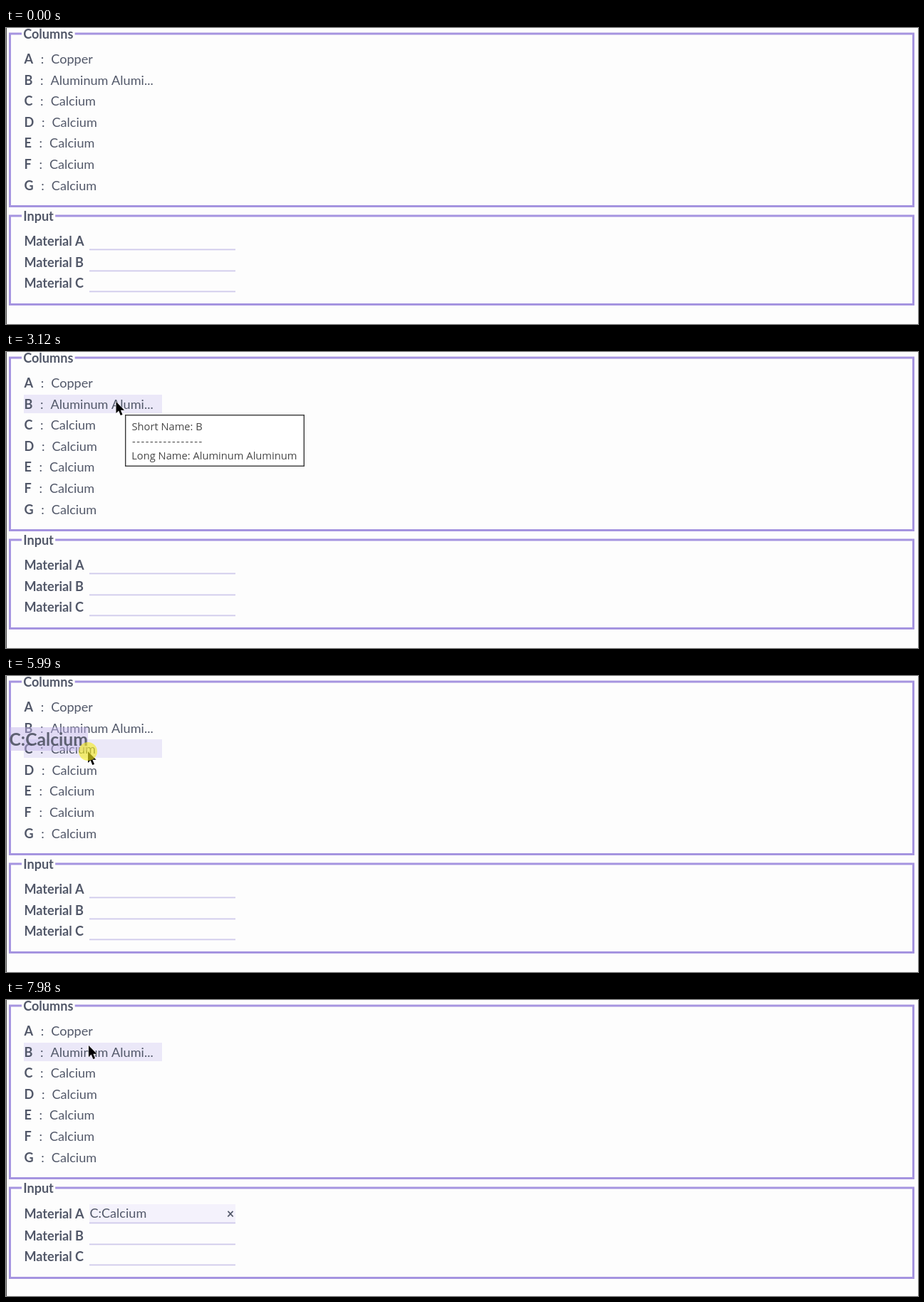
Animation of 1280 by 416 pixels, one loop 8000 ms. Source, as an HTML page with a canvas:

```html
<!DOCTYPE html>
<html lang="en">
<head>
<meta charset="utf-8">
<title>Column drag and drop</title>
<style>
  html, body { margin: 0; width: 100%; height: 100%; overflow: hidden; background: #fdfdfd; }
  canvas { display: block; }
</style>
</head>
<body>
<canvas id="stage" width="1280" height="416"></canvas>
<script>
const ctx = document.getElementById('stage').getContext('2d');
const LOOP = 8000, DRAG_START = 5990, DROP = 7350;
const STEP = 125, TIP_DELAY = 500, ROW = 29.6;
const PAPER = '#fdfdfd', PURPLE = '#a594e0', INK = '#525869', TIP_INK = '#484848';
const BODY = '18.1px Lato, sans-serif';
const BOLD = 'bold 18.1px Lato, sans-serif';
const GHOST = 'bold 24.7px Lato, sans-serif';
const TIP = '14.7px "Open Sans", sans-serif';

const columns = ['Copper', 'Aluminum Aluminum', ...Array(5).fill('Calcium')]
  .map((name, i) => ({ letter: 'ABCDEFG'[i], name }));

const easeOut = p => 1 - (1 - p) ** 2;
const smooth = p => p * p * (3 - 2 * p);

// The pointer reaches (x, y) in visible steps between two times.
const moves = [
  { start: 270, end: 270, x: 718, y: 344 },
  { start: 390, end: 760, x: 157, y: 77 },
  { start: 900, end: 1000, x: 155, y: 42.5 },
  { start: 2130, end: 2620, x: 154.5, y: 69 },
  { start: 4120, end: 4360, x: 110.5, y: 101 },
  { start: DRAG_START, end: DRAG_START, x: 115, y: 105 },
  { start: 6130, end: 6360, x: 203, y: 308, ease: smooth },
  { start: 6490, end: 6490, x: 206, y: 323 },
  { start: 6600, end: 6850, x: 194, y: 289 },
  { start: 7480, end: 7980, x: 116, y: 63, ease: smooth }
];

function pointerAt(t) {
  const i = moves.findLastIndex(move => move.start <= t);
  if (i < 0) return null;
  const { start, end, x, y, ease = easeOut } = moves[i];
  if (t >= end) return { x, y, rested: t - end };
  const from = moves[i - 1];
  const count = Math.round((end - start) / STEP) + 1;
  const p = ease((Math.floor((t - start) / STEP) + 1) / count);
  return { x: from.x + (x - from.x) * p, y: from.y + (y - from.y) * p, rested: 0 };
}

function text(str, x, y, font, color = INK, align = 'left') {
  ctx.font = font;
  ctx.fillStyle = color;
  ctx.textAlign = align;
  ctx.fillText(str, x, y);
}

function widthOf(str, font) {
  ctx.font = font;
  return ctx.measureText(str).width;
}

function box(x, y, w, h, color) {
  ctx.fillStyle = color;
  ctx.fillRect(x, y, w, h);
}

function frame(x, y, w, h, color, line) {
  ctx.strokeStyle = color;
  ctx.lineWidth = line;
  ctx.strokeRect(x + line / 2, y + line / 2, w - line, h - line);
}

function fieldset(title, top, bottom, baseline) {
  frame(4, top, 1271, bottom - top, PURPLE, 3);
  box(22, top - 1, widthOf(title, BOLD) + 4.5, 5, PAPER);
  text(title, 24.2, baseline, BOLD);
}

function drawColumns(hovered) {
  fieldset('Columns', 6.5, 252, 15);
  if (hovered >= 0) box(25, Math.round(30 + ROW * hovered), 194, 26, '#ebe8f8');
  columns.forEach(({ letter, name }, i) => {
    const y = Math.round(50 + ROW * i);
    const nameX = 50.7 + widthOf(letter, BOLD);
    text(letter, 25.6, y, BOLD);
    text(':', nameX - 12.3, y, BODY, INK, 'center');
    text(name.length > 14 ? name.slice(0, 14) + '...' : name, nameX, y, BODY);
  });
}

function drawInput(filled, target) {
  const shift = filled ? 2 : 0;
  fieldset('Input', 262.5, 390 + shift, 271);
  if (filled) {
    box(117, 287, 205, 26, '#f4f2fc');
    text('C:Calcium', 117.4, 306, BODY);
    text('×', 315, 307, BOLD, INK, 'center');
  }
  ['A', 'B', 'C'].forEach((letter, i) => {
    const y = Math.round(ROW * i);
    text('Material ' + letter, 25.4, 306 + y + (i ? shift : shift / 2), BOLD);
    box(117, 310.5 + y + shift, 205, 1.8, '#cfcaeb');
    if (i === target) frame(113, 283 + y, 212, 33, PURPLE, 3.5);
  });
}

function drawTooltip(x, y, { letter, name }) {
  const longName = 'Long Name: ' + name;
  const w = Math.round(widthOf(longName, TIP)) + 20;
  box(x, y, w, 73, '#fff');
  frame(x, y, w, 73, '#3a3a3a', 1.4);
  text('Short Name: ' + letter, x + 9.5, y + 22, TIP, TIP_INK);
  ctx.letterSpacing = '1.5px';
  text('-'.repeat(16), x + 10, y + 43, TIP, TIP_INK);
  ctx.letterSpacing = '0px';
  text(longName, x + 9.2, y + 63, TIP, TIP_INK);
}

function drawGhost(x, y) {
  box(x - 110, y - 33, 110, 33, 'rgba(190, 176, 232, 0.45)');
  text('C:Calcium', x - 110.5, y - 7, GHOST, 'rgba(72, 76, 92, 0.85)');
}

const arrow = new Path2D('M0 0V16L3.7 12.6L6.3 19L9 17.9L6.4 11.7H11.6Z');

function drawPointer(x, y) {
  ctx.save();
  ctx.translate(x, y + 1);
  ctx.strokeStyle = '#fff';
  ctx.stroke(arrow);
  ctx.fillStyle = '#000';
  ctx.fill(arrow);
  ctx.restore();
}

function drawPress(x, y) {
  ctx.fillStyle = 'rgba(246, 236, 30, 0.62)';
  ctx.beginPath();
  ctx.arc(x, y + 1, 13, 0, 2 * Math.PI);
  ctx.fill();
}

function rowUnder({ x, y }) {
  const row = Math.floor((y - 30) / ROW);
  return x >= 25 && x <= 219 && row < columns.length ? row : -1;
}

function draw(t) {
  const dragging = t >= DRAG_START && t < DROP;
  const pointer = pointerAt(t);

  let hovered = pointer ? rowUnder(pointer) : -1;
  if (dragging && hovered !== 2) hovered = -1;
  const target = dragging ? Math.floor((pointer.y - 284) / ROW) : -1;

  box(0, 0, 1280, 416, PAPER);
  box(0, 0, 1, 416, '#4a4a4a');
  drawColumns(hovered);
  drawInput(t >= DROP, target);
  if (!pointer) return;

  const { x, y, rested } = pointer;
  if (hovered >= 0 && rested >= TIP_DELAY) {
    drawTooltip(Math.round(x + 12.5), Math.round(y + 19), columns[hovered]);
  }
  if (dragging) drawGhost(x, y);
  ctx.lineWidth = 1;
  drawPointer(x, y);
  if (dragging) drawPress(x, y);
}

function tick() {
  draw(performance.now() % LOOP);
  requestAnimationFrame(tick);
}
tick();
</script>
</body>
</html>
```
